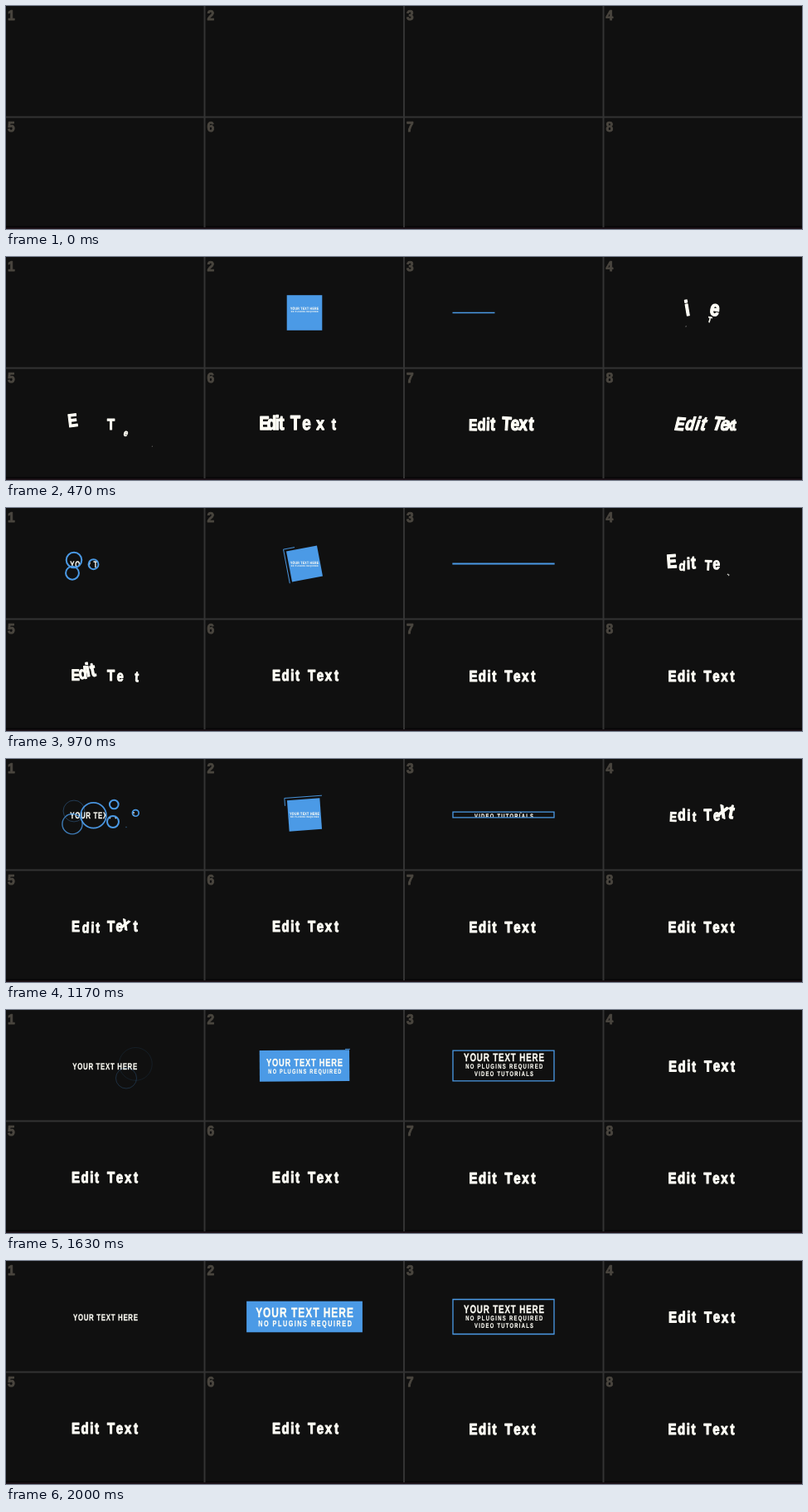
An HTML page for the animation above (2.03 s loop, 960 by 270 pixels).

```html
<!DOCTYPE html>
<html lang="en">
<head>
<meta charset="utf-8">
<title>Text animation presets</title>
<style>
  html, body { margin: 0; width: 100%; height: 100%; overflow: hidden; background: #101010; }
  svg { display: block; width: 960px; height: 270px; }
  text {
    font: bold 10px "Liberation Sans", Arial, sans-serif; fill: #fffef6; text-anchor: middle;
    stroke: #fffef6; stroke-width: .025em; stroke-linejoin: round; text-rendering: geometricPrecision;
  }
  .index { font-size: 17px; fill: #4a463f; stroke: #4a463f; stroke-width: .05em; text-anchor: start; }
  .letter { font-size: 18.8px; stroke-width: .06em; }
  .title { letter-spacing: .085em; }
  .sub { letter-spacing: .215em; }
</style>
</head>
<body>
<svg id="stage" viewBox="0 0 960 270"></svg>
<script>
const LOOP = 2030, BLUE = '#4b9ae6';
const CAPTION_WIDTH = 0.72, LETTER_WIDTH = 0.8;
const stage = document.getElementById('stage');

function add(parent, tag, attrs = {}, content) {
  const node = document.createElementNS('http://www.w3.org/2000/svg', tag);
  set(node, attrs);
  if (content) node.textContent = content;
  parent.appendChild(node);
  return node;
}
function set(node, attrs) {
  for (const key in attrs) node.setAttribute(key, attrs[key]);
}

const clamp = v => Math.max(0, Math.min(1, v));
const span = (t, start, length) => clamp((t - start) / length);
const easeOut = (u, power = 2) => 1 - (1 - u) ** power;
const easeInOut = (u, power = 2) =>
  u < 0.5 ? (2 * u) ** power / 2 : 1 - (2 - 2 * u) ** power / 2;
const spring = (age, decay) =>
  age < 0 ? 0 : 1 - Math.exp(-age / decay) * Math.cos(age * Math.PI / 260);

// A condensed caption centred on x, allowing for the trailing letter space.
function caption(parent, kind, size, x, y, words) {
  const shift = size * (kind === 'title' ? 0.085 : 0.215) / 2;
  return add(parent, 'text', {
    class: kind, x: shift, style: `font-size:${size}px`,
    transform: `translate(${x} ${y}) scale(${CAPTION_WIDTH} 1)`
  }, words);
}

// Board
add(stage, 'rect', { width: 960, height: 270, fill: '#101010' });
add(stage, 'rect', { y: 266.5, width: 960, height: 2, fill: '#070607' });
add(stage, 'rect', { y: 268.5, width: 960, height: 1.5, fill: '#20131b' });
add(stage, 'path', {
  d: 'M239.5 0V268M480 0V268M720.5 0V268M0 134.5H960', stroke: '#333', 'stroke-width': 2
});
for (let i = 0; i < 8; i++) {
  add(stage, 'text', {
    class: 'index',
    transform: `translate(${2 + (i % 4) * 240.5} ${i < 4 ? 17 : 152}) scale(.92 1)`
  }, i + 1);
}

// 1: rings uncover the caption
function ringsCell() {
  const rings = [
    // x, y, radius, start, duration
    [82, 63, 13.5, 720, 560], [80, 78.7, 14.3, 727, 720], [105.5, 68.2, 20, 876, 560],
    [129, 76, 13.2, 991, 560], [130.3, 55, 16, 1064, 560], [156.3, 65.4, 20, 1110, 560],
    [145, 82.5, 12.8, 1155, 560]
  ];
  const clip = add(stage, 'clipPath', { id: 'discs' });
  const discs = rings.map(([cx, cy]) => add(clip, 'circle', { cx, cy }));
  const group = add(stage, 'g', { 'clip-path': 'url(#discs)' });
  const slider = add(group, 'g');
  caption(slider, 'title', 10.96, 120, 71.8, 'YOUR TEXT HERE');
  const outlines = rings.map(([cx, cy]) =>
    add(stage, 'circle', { cx, cy, fill: 'none', stroke: BLUE }));

  return t => {
    rings.forEach(([, , radius, start, duration], i) => {
      const u = span(t, start, duration), r = radius * easeOut(u);
      set(discs[i], { r });
      set(outlines[i], {
        r,
        opacity: u > 0 ? Math.min(1, 2 * (1 - u)) : 0,
        'stroke-width': Math.min(2, Math.max(0.8, 3.6 * (1 - u)), r * 0.42 + 0.1)
      });
    });
    const age = Math.max(0, t - 1170);
    const sway = -3.8 * Math.exp(-((age / 370) ** 2)) * Math.cos(Math.PI * age / 220);
    set(slider, { transform: `translate(${sway} 0)` });
  };
}

// 2: spinning square widens into a banner, chased by a line
function bannerCell() {
  const spinner = add(stage, 'g');
  const box = add(spinner, 'rect', { fill: BLUE });
  const trail = add(spinner, 'path', { fill: 'none', stroke: BLUE, 'stroke-width': 0.9 });
  const words = add(stage, 'g');
  caption(words, 'title', 16.58, 0, 0.5, 'YOUR TEXT HERE');
  caption(words, 'sub', 10.03, 0.5, 12, 'NO PLUGINS REQUIRED');

  // Point on the outline, one unit per side, clockwise from the top right.
  function corner(s, w, h) {
    const side = Math.min(3, Math.floor(s)), k = s - side;
    return [[w, -h + 2 * h * k], [w - 2 * w * k, h], [-w, h - 2 * h * k], [-w + 2 * w * k, -h]][side];
  }

  return t => {
    const pop = 42.6 * easeOut(span(t, 270, 190)) - 5 * easeInOut(span(t, 470, 120));
    const grow = easeInOut(span(t, 1020, 1050), 2.6);
    const w = pop + 102.5 * grow, h = pop;
    const turn = 90 * (1 - Math.exp((520 - t) / 210));
    const angle = t < 520 || t > 1960 ? 0 : turn - 90;
    set(spinner, { transform: `translate(360 67.5) rotate(${angle})` });
    set(box, { x: -w / 2, y: -h / 2, width: w, height: h });

    const gap = 3 * (1 - grow);
    const tail = 4 * easeOut(span(t, 520, 1180), 1.5);
    const head = 4 * easeOut(span(t, 510, 660), 1.5);
    const stops = [tail, ...[1, 2, 3].filter(s => s > tail && s < head), head];
    const points = stops.map(s => corner(s, w / 2 + gap, h / 2 + gap).join(' '));
    set(trail, { d: head > tail ? 'M' + points.join('L') : '' });

    const scale = (0.29 + 0.71 * grow) * Math.min(1, pop / 37.5);
    const lift = Math.max(0, pop - 37.6) * 0.7;
    set(words, { transform: `translate(360 ${67.5 - lift}) scale(${scale})` });
  };
}

// 3: a line opens into a frame
function frameCell() {
  const clip = add(stage, 'clipPath', { id: 'opening' });
  const hole = add(clip, 'rect', { x: 539, width: 122 });
  const group = add(stage, 'g', { 'clip-path': 'url(#opening)' });
  const words = add(group, 'g');
  caption(words, 'title', 13.63, 600.5, 63, 'YOUR TEXT HERE');
  caption(words, 'sub', 8.25, 600.7, 72.3, 'NO PLUGINS REQUIRED');
  caption(words, 'sub', 8.15, 600.5, 80.8, 'VIDEO TUTORIALS');
  const border = add(stage, 'path', { fill: 'none', stroke: BLUE, 'stroke-width': 1.3 });

  return t => {
    const length = 122 * easeInOut(span(t, 112, 776));
    const open = easeInOut(span(t, 890, 985));
    const h = 42 * open, top = 67.5 - h / 2;
    set(hole, { y: top, height: h });
    set(words, { transform: `translate(0 ${-10 * (1 - open)})` });
    set(border, {
      d: !length ? '' : h ? `M539 ${top}h122v${h}h-122z` : `M538.5 67.5h${length}`
    });
  };
}

// 4 to 8: letters placed round a centre, each posed by a rule
const LETTERS = [...'EditText'];
const OFFSETS = [-36, -25, -16.7, -10.5, 6.5, 17, 27, 36.5];

function lettersCell(centre, baseline, pose) {
  const nodes = LETTERS.map(c => add(stage, 'text', { class: 'letter', y: 6.5 }, c));
  return t => nodes.forEach((node, i) => {
    const { dx, dy, turn = 0, skew = 0, scale } = pose(t, i);
    set(node, {
      display: scale > 0.02 ? 'inline' : 'none',
      transform: `translate(${centre + OFFSETS[i] + dx} ${baseline - 7 + dy}) ` +
        `rotate(${turn}) skewX(${skew}) scale(${LETTER_WIDTH * scale} ${scale})`
    });
  });
}

function springPose(starts, fromX, fromY, turns, decay) {
  return (t, i) => {
    const age = t - starts[i], p = spring(age, decay), rest = 1 - p;
    return {
      dx: fromX * rest, dy: fromY * rest, turn: turns[i] * rest,
      scale: age < 0 ? 0 : Math.max(0.08, p)
    };
  };
}

// A sideways push runs through the word from left to right.
function wavePose(push, lift, lean, swell, turn) {
  return (t, i) => {
    const age = t - 470 - (i - 4) * 33;
    const reach = age < 0 ? 140 : 380;
    const bump = Math.abs(age) < reach ? Math.cos(Math.PI / 2 * age / reach) ** 2 : 0;
    return {
      dx: push * bump, dy: lift * bump, skew: lean * bump, turn: turn * bump,
      scale: easeOut(span(age, -200, 110)) * (1 + swell * bump)
    };
  };
}

const cells = [
  ringsCell(), bannerCell(), frameCell(),
  lettersCell(840, 75, springPose(
    [650, 465, 230, 625, 395, 235, 930, 985], 5, 16, [18, 25, 25, 10, 28, -25, -60, -40], 250)),
  lettersCell(120, 209.5, springPose(
    [170, 640, 715, 725, 75, 390, 1010, 465], 20, 27, [40, 50, 40, 45, 30, 55, -160, 60], 180)),
  lettersCell(362, 209.5, wavePose(-19.5, -1.5, 0, 0.3, 0)),
  lettersCell(599.5, 210.5, springPose(
    LETTERS.map((_, i) => 100 + i * 25), 10, 8, LETTERS.map(() => -15), 180)),
  lettersCell(839.5, 210.5, wavePose(13, -2, -14, 0.25, 5))
];

function draw(ms) {
  // The picture advances thirty times a second.
  const t = Math.floor(ms * 0.03 + 0.21) * 100 / 3;
  cells.forEach(cell => cell(t));
}

const begin = performance.now();
function tick() {
  draw((performance.now() - begin) % LOOP);
  requestAnimationFrame(tick);
}
draw(0);
requestAnimationFrame(tick);
</script>
</body>
</html>
```
